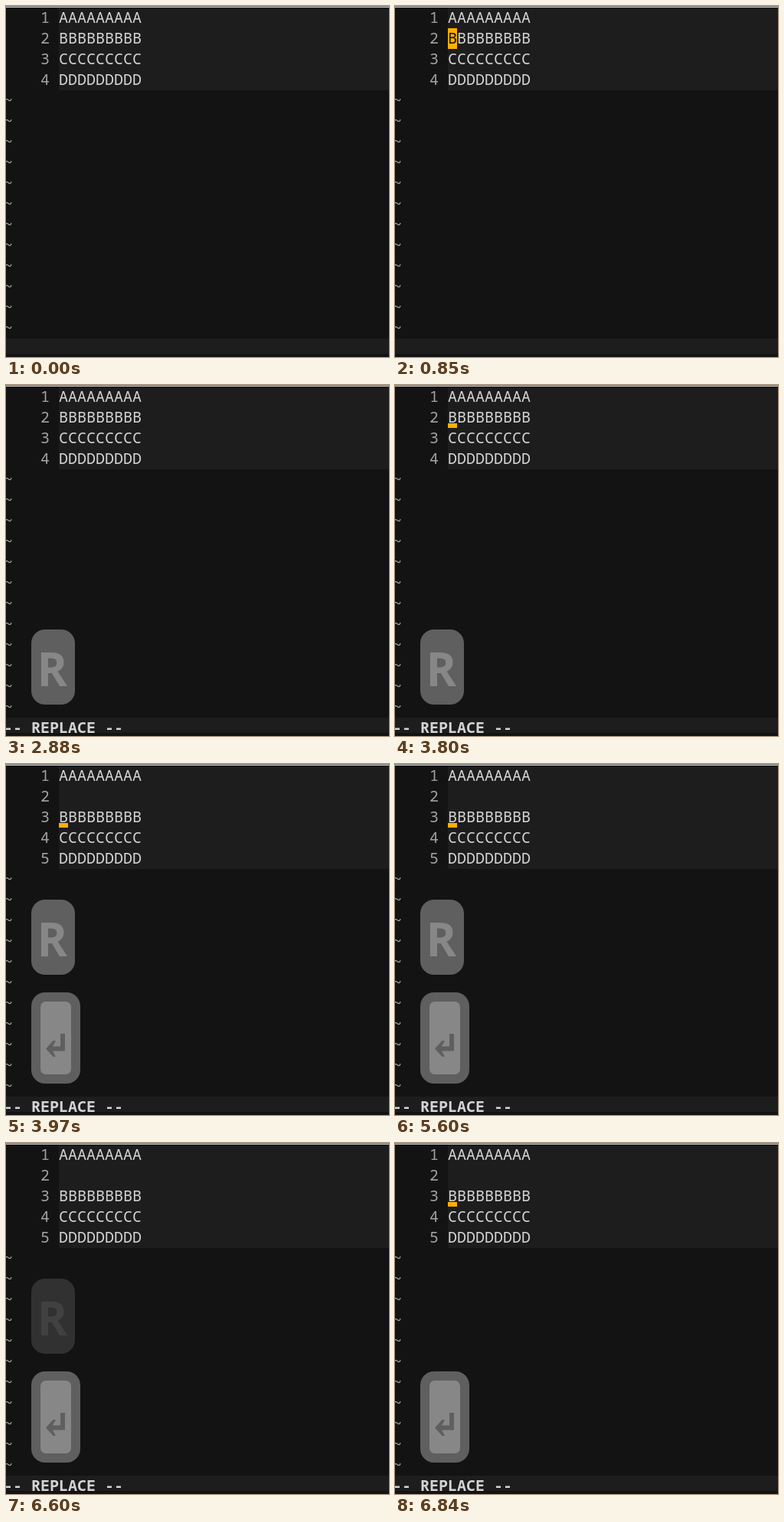
Write an HTML page that moves like this. It is 500 by 458 pixels and loops after 7.16 s.

```html
<!DOCTYPE html>
<html lang="en">
<head>
<meta charset="utf-8">
<title>Replace mode</title>
<style>
  html, body { margin: 0; width: 100%; height: 100%; overflow: hidden; background: #131313; }
  svg { display: block; width: 500px; height: 458px; }
  text { font: 20px "Noto Sans Mono", monospace; fill: #d4d4d4; }
  .number { fill: #a2a2a2; }
  .tilde { fill: #aaa49e; }
  .mode { font-weight: 700; }
  .key { fill: #5f5f5f; }
  .cap { fill: #878787; }
  .letter { font: 700 60px "Open Sans", sans-serif; fill: #878787; }
</style>
</head>
<body>
<svg id="stage" viewBox="0 0 500 458"></svg>
<script>
const LOOP = 7160, REPLACE = 1550, ENTER = 3970;
const CELL = 12, ROW = 27, LEFT = -3, TOP = 2, TEXT_COL = 6;
// Cursor toggles, starting hidden; entering a command shows it at once.
const BLINKS = [240, 620, 850, 1310, 1550, 2250, 2480, 2880, 3190, 3580, 3800,
  4670, 4900, 5280, 5600, 5970, 6220, 6600, 6840];

const colX = col => LEFT + col * CELL;
const rowY = row => TOP + row * ROW;
const rect = (x, y, w, h, fill) =>
  `<rect x="${x}" y="${y}" width="${w}" height="${h}" fill="${fill}"/>`;
const text = (str, col, row, attrs = '') =>
  `<text x="${colX(col)}" y="${rowY(row) + 20}" ${attrs}>${str}</text>`;

function cursor(row, block) {
  const x = colX(TEXT_COL), y = rowY(row);
  return block
    ? rect(x, y, CELL, ROW, '#ffaf00') + text('B', TEXT_COL, row, 'style="fill:#131313"')
    : rect(x, y + 21, CELL, 6, '#ffaf00');
}

const letterKey = (y, opacity) => `<g opacity="${opacity}">
  <rect class="key" x="33" y="${y}" width="57" height="98" rx="18"/>
  <text class="letter" x="40.6" y="${y + 74}">R</text></g>`;

const enterKey = () => `
  <rect class="key" x="33" y="298" width="64" height="119" rx="18"/>
  <rect class="cap" x="45" y="310" width="40" height="95" rx="7"/>
  <path class="key" d="M71 352h6v22.5H61l4 7.5h-3.5L52 371.5 61.5 361H65l-4 7.5H71z"/>`;

const fade = t => t < 6520 ? 1 : t < 6600 ? 0.79 : t < 6690 ? 0.4 : 0;

function scene(t) {
  const replacing = t >= REPLACE, entered = t >= ENTER;
  const lines = [...'ABCD'].map(c => c.repeat(9));
  if (entered) lines.splice(1, 0, '');

  let out = rect(0, 0, 500, 458, '#131313') + rect(0, 0, 500, 1, '#666')
    + rect(0, 1, 500, 1, '#ddd')
    + rect(colX(TEXT_COL), TOP, 431, lines.length * ROW, '#1d1d1d')
    + rect(0, rowY(16), 500, 20, '#1d1d1d');

  lines.forEach((line, i) => {
    out += text(i + 1, 4, i, 'class="number"') + text(line, TEXT_COL, i);
  });
  for (let i = lines.length; i < 16; i++) out += text('~', 0, i, 'class="tilde"');

  if (BLINKS.filter(b => b <= t).length % 2) out += cursor(entered ? 2 : 1, !replacing);
  if (replacing) {
    out += text('-- REPLACE --', 0, 16, 'class="mode"')
      + letterKey(entered ? 177 : 319, fade(t));
  }
  if (entered) out += enterKey();
  return out;
}

const stage = document.getElementById('stage');
const start = performance.now();
let shown = '';
function draw() {
  const next = scene((performance.now() - start) % LOOP);
  if (next !== shown) stage.innerHTML = shown = next;
  requestAnimationFrame(draw);
}
draw();
</script>
</body>
</html>
```
